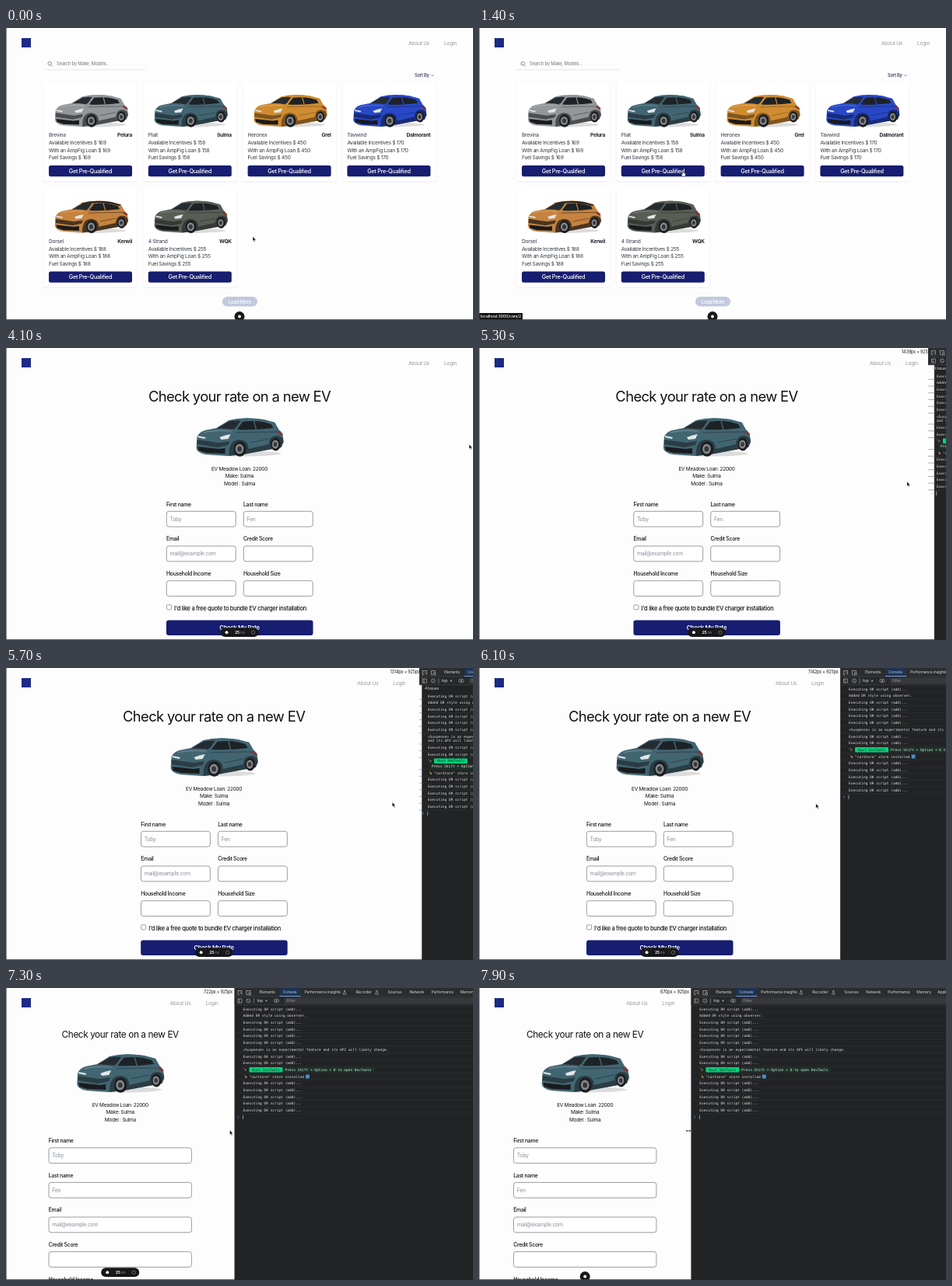
Write an HTML page that moves like this. It is 600 px wide and 376 px high and loops after 8000 ms.

```html
<!DOCTYPE html>
<html lang="en">
<head>
<meta charset="utf-8">
<title>Car loan pages</title>
<style>
html, body { margin: 0; width: 100%; height: 100%; overflow: hidden; background: #fdfdfd; }
#stage { display: block; width: 600px; height: 376px; }
text { font-family: Inter, Roboto, sans-serif; letter-spacing: -.04em; white-space: pre; }
.head { letter-spacing: -.035em; }
.mono { font-family: "DejaVu Sans Mono", monospace; letter-spacing: 0; }
</style>
</head>
<body>
<svg id="stage" viewBox="0 0 600 376" xmlns="http://www.w3.org/2000/svg"></svg>
<script>
const LOOP = 8000, NAVY = '#171d70', INK = '#111', PX = 2.46, FULL = 1476;

const rect = (x, y, w, h, fill, r = 0, more = '') =>
  `<rect x="${x}" y="${y}" width="${w}" height="${h}" rx="${r}" fill="${fill}" ${more}/>`;
const line = (d, color, w = .7) => `<path d="${d}" fill="none" stroke="${color}" stroke-width="${w}"/>`;
const shape = (d, fill) => `<path d="${d}" fill="${fill}"/>`;
const dot = (x, y, r, fill, more = '') => `<circle cx="${x}" cy="${y}" r="${r}" fill="${fill}" ${more}/>`;
const label = (x, y, str, size, fill = INK, more = '') =>
  `<text x="${x}" y="${y}" font-size="${size}" fill="${fill}" ${more}>${str}</text>`;
const MID = 'text-anchor="middle"', END = 'text-anchor="end"';
const group = (id, body) => `<g id="${id}">${body}</g>`;

// Three-quarter view of a small crossover, 113 by 52
function car(x, y, k, paint, dark, roof = paint) {
  const oval = (cx, cy, rx, ry, fill) => `<ellipse cx="${cx}" cy="${cy}" rx="${rx}" ry="${ry}" fill="${fill}"/>`;
  const wheel = (cx, cy, rx, ry) => oval(cx, cy, rx, ry, '#1c1d20') +
    oval(cx - .5, cy, rx * .66, ry * .66, '#85888c') + oval(cx - .5, cy, rx * .36, ry * .36, '#35373a');
  return `<g transform="translate(${x} ${y}) scale(${k})">` +
    oval(58, 47, 52, 3.5, '#dcdcdd') +
    shape('M1 40L2 25Q5 19 12 17L27 14L43 4Q62-1 87 3L102 7L107 16Q113 20 113 32L110 39L62 47L42 50L14 48Q2 46 1 40Z', paint) +
    shape('M41 5Q62-1 87 3L102 7L100 9L88 6Q66 3 43 6Z', roof) +
    shape('M43 45Q44 29 57 29Q68 30 68 41L94 35Q95 24 104 24Q112 24 113 32L110 39L62 48L43 50Z', dark) +
    shape('M2 29L30 33L44 31L42 36L28 39L2 35Z', dark) +
    shape('M27 14.500L43 5.500Q52 4 58 4.800L50 16Q38 14 27 14.500Z', '#252c31') +
    shape('M53 16L61 5.800Q76 4 88 6.500L97 9L100 14Q76 17 53 16Z', '#1d2226') +
    line('M75 5L78 16', paint, 1.4) +
    line('M52 20Q80 19 108 19M70 33L94 28', dark, .8) +
    line('M10 20Q24 16 47 18', 'rgba(255,255,255,.22)', 1.2) +
    shape('M3 24L13 26L12 28L3 26ZM31 26Q38 23 45 22L42 28L33 29Z', '#e2e6e8') +
    shape('M3 38L30 41L38 40L38 47L14 46L4 43Z', '#191b1e') +
    shape('M49 15L54 14L54 17.500L50 17.500Z', paint) +
    shape('M105 18L112 21L112 24L106 21Z', '#8c2f2d') +
    wheel(57, 41, 8.2, 9.8) + wheel(103, 35, 6.3, 8.5) + '</g>';
}

const CARS = [
  ['Brevina', 'Pelura', 169, '#94979a', '#4b4e51'],
  ['Plait', 'Sulma', 158, '#426572', '#2a3d45'],
  ['Heronex', 'Grel', 450, '#d08c30', '#7f5520'],
  ['Tavwind', 'Dalmorant', 170, '#2848c6', '#182b78'],
  ['Dorsel', 'Kerwil', 188, '#c5833f', '#4a3522', '#2a2320'],
  ['4 Strand', 'WQK', 255, '#585d55', '#363a35']
];

function card([model, make, sum, paint, dark, roof], i) {
  const x = 49 + i % 4 * 127.8, y = i > 3 ? 136.5 : 0;
  const rows = ['Available Incentives', 'With an AmpFig Loan', 'Fuel Savings'];
  return `<g transform="translate(${x} ${y})">` +
    rect(-.4, 70.5, 120.3, 128, '#eeeeef', 2) + rect(0, 70, 119.5, 127.6, '#fff', 2) +
    car(13, 85, .84, paint, dark, roof) +
    label(6, 140, model, 6.6, '#4c5160', 'font-weight="500"') +
    label(113, 140, make, 6.6, '#22252e', END + ' font-weight="700"') +
    rows.map((s, n) => label(6, 150.2 + n * 9.6, `${s} $ ${sum}`, 6.6, '#33363e')).join('') +
    rect(6, 177, 107, 14.2, NAVY, 2.5) +
    label(59.5, 186.7, 'Get Pre-Qualified', 7.3, '#fff', MID + ' font-weight="500"') + '</g>';
}

const listPage = () =>
  dot(56.2, 45.8, 2.3, 'none', 'stroke="#777" stroke-width=".8"') + line('M58 47.500L60 49.500', '#777', .8) +
  label(65, 48.4, 'Search by Make, Models...', 5.9, '#777') +
  line('M49 53.800H180', '#dcdcdf', .7) +
  label(525, 63.2, 'Sort By', 5.8, '#2b3050', 'font-weight="500"') +
  line('M546.300 60.500L547.800 62L549.300 60.500', '#2b3050', .6) +
  CARS.map(card).join('') +
  rect(278, 346, 45, 12.5, '#c0c9de', 6.25) +
  label(300.5, 354.5, 'Load More', 6.2, '#fff', MID + ' font-weight="500"');

function field(x, y, w, name, hint = '') {
  return label(x, y - 6.3, name, 6.9, INK, 'font-weight="500"') +
    rect(x + .3, y + .3, w - .6, 19.8, '#fff', 3, 'stroke="#80848e" stroke-width=".8"') +
    label(x + 4.5, y + 12.7, hint, 6.9, '#8a8f99');
}
const FIELDS = [['First name', 'Toby'], ['Last name', 'Fen'], ['Email', 'mail@example.com'],
  ['Credit Score'], ['Household Income'], ['Household Size']];

const intro = dy => car(-56.5, 89 + dy, 1, '#426572', '#2a3d45') +
  ['EV Meadow Loan: 22000', 'Make: Sulma', 'Model : Sulma']
    .map((s, i) => label(0, 157.5 + dy + i * 9.6, s, 6.5, INK, MID)).join('');

const widePage = () =>
  label(0, 69, 'Check your rate on a new EV', 18.4, INK, MID + ' class="head"') + intro(0) +
  FIELDS.map((f, i) => field(i % 2 ? 5 : -94, 210 + (i >> 1) * 44.7, 89.5, ...f)).join('') +
  rect(-93.5, 330.8, 6, 6, '#fff', 1, 'stroke="#777" stroke-width=".7"') +
  label(-84, 337.6, "I'd like a free quote to bundle EV charger installation", 7.5, INK, 'font-weight="500"') +
  rect(-94, 350.5, 188.5, 19.6, NAVY, 3) +
  label(0, 363, 'Check My Rate', 7.6, '#fff', MID + ' font-weight="600"');

const slimPage = () =>
  label(0, 64, 'Check your rate on a new EV', 11.8, INK, MID + ' class="head"') + intro(-5) +
  FIELDS.slice(0, 5).map((f, i) => field(-92, 205.5 + i * 44.6, 184, ...f)).join('');

const flask = x => line(`M${x} 3.500h2M${x + .5} 3.500v1.500l-1.500 3h4l-1.500-3v-1.500`, '#bbb', .6);
const TABS = [[32, 'Elements'], [62, 'Console'], [90, 'Performance insights'], [156, 'Recorder'],
  [197, 'Sources'], [225, 'Network'], [253, 'Performance'], [290, 'Memory'], [317, 'Application']];

const toolbar = () =>
  rect(0, 0, 620, 11, '#2b2c2e') + rect(0, 11, 620, 10.8, '#28292b') +
  line('M0 11H620M0 21.800H620', '#47494c', .5) +
  rect(58, 0, 27, 11, '#1f3350') + rect(58, 10.2, 27, .8, '#8ab4f8') +
  TABS.map(([x, s]) => label(x, 7.4, s, 5, s === 'Console' ? '#a8c7fa' : '#d5d6d8')).join('') +
  flask(140.5) + flask(182) +
  line('M4.500 3.500h5v4M4.500 3.500v5h2M7 5.500l3 3M15.500 3.500h5v2M15.500 3.500v5h2M18.500 6h2.500v3h-2.500z', '#bbb', .7) +
  line('M4.500 14h5v5h-5zM6.200 14v5', '#bbb', .6) +
  dot(18, 16.4, 2.5, 'none', 'stroke="#bbb" stroke-width=".6"') + line('M16.300 14.700l3.500 3.500M25 13v7', '#bbb', .5) +
  label(29, 18.3, 'top', 5.3, '#d5d6d8') + shape('M39.500 15.800h3l-1.500 2z', '#bbb') +
  `<ellipse cx="54" cy="16.4" rx="3.3" ry="2.2" fill="none" stroke="#bbb" stroke-width=".6"/>` + dot(54, 16.4, 1, '#bbb') +
  rect(64, 12.5, 560, 8, '#38393c', 2) + label(67, 18.3, 'Filter', 5.2, '#929497');

// Console rows; a narrow panel pushes them down and wraps two of them
function consoleRows(narrow) {
  const mono = (x, y, s, fill = '#e0e0e0') => label(x, y + 1.6, s, 4.5, fill, 'class="mono"');
  const run = 'Executing DR script (add)...';
  let y = 27, out = '';
  if (narrow) { out += label(7, 28, '4 Issues', 5, '#d5d6d8'); y += 9; }
  for (let i = 0; i < 16; i++) {
    let wrap = 0;
    if (i === 6) {
      const a = '&lt;Suspense&gt; is an experimental feature', b = 'and its API will likely change.';
      out += narrow ? mono(11, y, a) + mono(11, y + 5.5, b) : mono(11, y, a + ' ' + b);
      wrap = 5.5;
    } else if (i === 9) {
      const px = narrow ? 16 : 65, py = narrow ? y + 7 : y;
      out += rect(px - 2, py - 3, 117, 6, '#1b3429', 1) + rect(19, y - 3.2, 43, 6.4, '#00d27c', 1) +
        mono(23, y, 'Nuxt DevTools', '#0c2c1e') + mono(px, py, 'Press Shift + Option + D to open DevTools') +
        line(`M13 ${y - 1.5}l2.500 1.500l-2.500 1.500M11.500 ${y - 2}v1`, '#c9b98a', .6);
      wrap = 6.5;
    } else if (i === 10) {
      out += mono(19, y, '"carStore" store installed') +
        line(`M13 ${y - 2.2}l1 1.600`, '#5d9a48', .8) + line(`M14 ${y - .6}l1.800 2.400`, '#d98a3a', 1.7) +
        rect(91.5, y - 2.4, 5, 4.8, '#4c8fc4', .8);
    } else out += mono(11, y, i === 1 ? 'Added DR style using observer.' : run);
    y += 8.7 + (narrow ? wrap : 0);
    out += line(`M0 ${y - 4.35}H620`, '#3a3b3d', .4);
  }
  return out + line(`M4 ${y - 1.5}l1.600 1.500l-1.600 1.500`, '#7ea6e0', .6) + rect(10.6, y - 2.5, .6, 5.2, '#ddd');
}

const svg = document.getElementById('stage');
svg.innerHTML =
  rect(0, 0, 600, 376, '#fdfdfd') +
  group('list', listPage()) + group('wide', widePage()) + group('slim', slimPage()) +
  rect(20, 13, 12, 12, '#1d2a86') +
  group('nav', label(517, 22.2, 'About Us', 6.7, '#9a9a9e') + label(563, 22.2, 'Login', 6.7, '#9a9a9e')) +
  group('pill', `<rect id="hull" fill="#161719"/>` + dot(0, 0, 2, '#f2f2f2', 'id="mark"') +
    group('info', label(-6, 368, '25', 5.2, '#fff', 'font-weight="600"') + label(1, 368, 'ms', 4.2, '#8b8b8b') +
      line('M-11 363.500v5M12 363.500v5', '#3a3a3a', .4) +
      dot(17.5, 366.2, 2.2, 'none', 'stroke="#8b8b8b" stroke-width=".7"'))) +
  group('status', rect(0, 367, 56, 9, '#111', 1) + label(2, 373.3, 'localhost:3000/cars/2', 5.3, '#f4f4f4', 'font-weight="500"')) +
  rect(0, 0, .7, 376, '#55575a') + rect(0, 375.2, 600, .8, '#3c3d40') +
  group('size', rect(-45, 0, 45, 11, '#fdfdfd') + label(-2.5, 7.4, '', 5.6, '#222', END + ' id="dims"')) +
  group('panel', rect(0, 0, 620, 376, '#222325') +
    group('tools', toolbar() + group('loose', consoleRows(false)) + group('tight', consoleRows(true))) +
    rect(0, 0, .6, 376, '#4a4c50')) +
  group('arrow', `<path d="M0 0V6L1.400 4.800L2.300 6.900L3.300 6.400L2.400 4.400H4.200Z" fill="#000" stroke="#fff" stroke-width=".5"/>`) +
  group('hand', `<path d="M-.7 0Q0-.8 .7 0V2.500L3 3.200Q3.800 3.500 3.500 4.700L3 7H-.8L-2.500 4.300Q-2 3.500-.7 4.500Z" fill="#fff" stroke="#000" stroke-width=".5"/>`) +
  group('drag', `<path d="M-3.300 0L-1.500-1.800V-.5H1.500V-1.800L3.300 0L1.500 1.800V.5H-1.500V1.800Z" fill="#000" stroke="#fff" stroke-width=".4"/>`);

const el = {};
svg.querySelectorAll('[id]').forEach(n => el[n.id] = n);
const show = (id, on) => el[id].setAttribute('display', on ? 'inline' : 'none');
const move = (id, x, y = 0) => el[id].setAttribute('transform', `translate(${x} ${y})`);
const set = (id, attrs) => { for (const k in attrs) el[id].setAttribute(k, attrs[k]); };
const clamp = v => Math.max(0, Math.min(1, v));

// Monotone cubic through [time, value] pairs
function curve(keys, t) {
  const last = keys.length - 1;
  if (t <= keys[0][0]) return keys[0][1];
  if (t >= keys[last][0]) return keys[last][1];
  const i = keys.findIndex(k => k[0] > t) - 1;
  const rate = n => n < 0 || n >= last ? 0 : (keys[n + 1][1] - keys[n][1]) / (keys[n + 1][0] - keys[n][0]);
  const slope = n => { const a = rate(n - 1), b = rate(n); return a * b > 0 ? 2 * a * b / (a + b) : 0; };
  const [t0, a] = keys[i], [t1, b] = keys[i + 1], h = t1 - t0, u = (t - t0) / h;
  return a + (b - a) * u * u * (3 - 2 * u) + h * u * (1 - u) * (slope(i) * (1 - u) - slope(i + 1) * u);
}

const WIDTH = [[4950, FULL], [5300, 1439], [6100, 1142], [6600, 916], [7300, 722], [7900, 670]];
const MOUSE_X = [[100, 317], [1200, 262], [2200, 262], [2500, 270], [2750, 275], [3600, 590], [4100, 595],
  [4500, 598], [4800, 598], [5300, 550], [6100, 433], [6600, 338.5], [7300, 287.5], [7900, 269]];
const MOUSE_Y = [[100, 268.5], [1200, 184], [2200, 184], [2500, 188], [2750, 188], [3600, 96], [4100, 124],
  [4250, 124], [4500, 172], [5300, 172], [6100, 174.5], [6600, 181], [7300, 183], [7900, 184]];

function draw(t) {
  const form = t >= 2100, px = curve(WIDTH, t), w = px / PX, mid = w / 2, slim = px < 768;
  show('list', !form);
  show('wide', form && !slim);
  show('slim', form && slim);
  ['wide', 'slim', 'pill'].forEach(id => move(id, mid));
  move('nav', w - 600);

  const open = clamp((t - 2150) / 200) * (1 - clamp((t - 7550) / 200));
  const half = 6.5 + 18 * open, top = 365 - 4.7 * open, tall = 13 - 1.2 * open;
  set('hull', { x: -half, y: top, width: half * 2, height: tall, rx: tall / 2 });
  set('mark', { cx: -16.5 * open, cy: top + tall / 2 });
  show('info', open > .8);
  show('status', t >= 1150 && t < 2600);

  const docked = px < FULL;
  show('panel', docked);
  show('size', docked);
  move('panel', w);
  move('size', w);
  move('tools', -8 * clamp((w - 500) / 80));
  show('tight', w > 500);
  show('loose', w <= 500);
  el.dims.textContent = `${Math.round(px)}px × 925px`;

  // Tools slide left of the edge on a narrow panel, so keep them inside it
  el.panel.style.clipPath = 'inset(0 0 0 0)';

  const x = curve(MOUSE_X, t), y = curve(MOUSE_Y, t);
  const kind = t > 1150 && t < 2150 ? 'hand' : t >= 7500 || t > 4450 && t < 4850 ? 'drag' : 'arrow';
  ['arrow', 'hand', 'drag'].forEach(id => { show(id, id === kind); move(id, x, y); });
}

// The panel's contents are cut at its left edge
svg.insertAdjacentHTML('afterbegin', '<clipPath id="edge"><rect width="620" height="376"/></clipPath>');
el.panel.setAttribute('clip-path', 'url(#edge)');

const start = performance.now();
function tick() {
  draw((performance.now() - start) % LOOP);
  requestAnimationFrame(tick);
}
tick();
</script>
</body>
</html>
```
